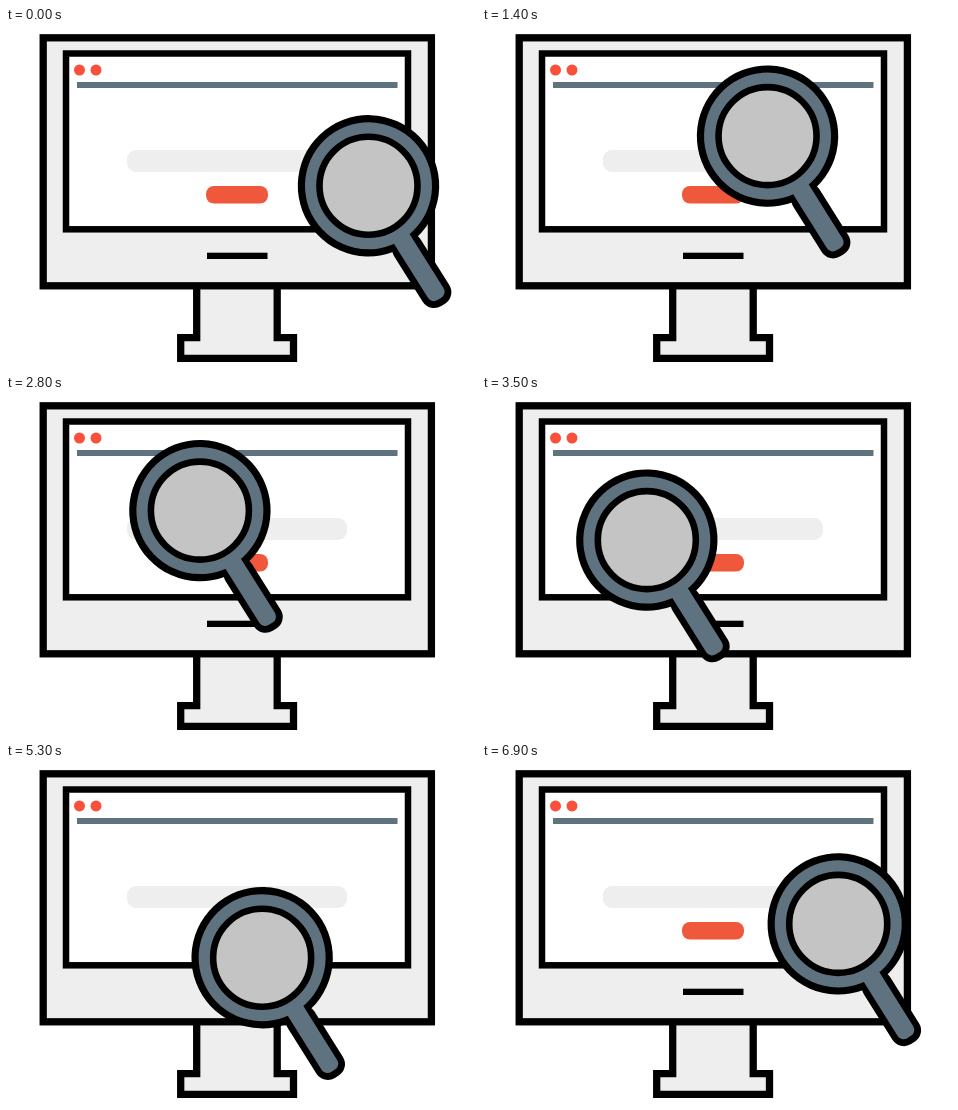
An HTML page for the animation above (7000 ms loop, 470 px wide and 340 px high).

```html
<!DOCTYPE html>
<html lang="en">
<head>
<meta charset="utf-8">
<title>Search</title>
<style>
  html, body { margin: 0; width: 100%; height: 100%; overflow: hidden; background: #fff; }
  svg { display: block; width: 470px; height: 340px; }
  .frame { fill: #eee; stroke: #000; stroke-width: 7.3; }
  .steel { fill: #5f727f; }
  .dot { fill: #f9503c; }
</style>
</head>
<body>
<svg viewBox="0 0 470 340">
  <path class="frame" d="M190.7 258V309.7H174.7V330.3H287.5V309.7H271.2V258"/>
  <rect class="frame" x="37.2" y="9.8" width="388.2" height="248"/>
  <rect class="frame" x="60" y="25.5" width="342" height="175.8" style="fill:#fff;stroke-width:6.5"/>
  <circle class="dot" cx="73.5" cy="42" r="5.5"/>
  <circle class="dot" cx="90" cy="42" r="5.5"/>
  <rect class="steel" x="71" y="54" width="320.5" height="6"/>
  <rect x="121" y="122" width="220" height="22" rx="9" fill="#eee"/>
  <rect x="200" y="158" width="62" height="17.5" rx="8" fill="#ef583b"/>
  <rect x="201" y="224.7" width="60.5" height="6.3"/>

  <g id="glass">
    <g transform="rotate(57.9)">
      <circle r="70.7"/>
      <rect x="60" y="-15.7" width="80.5" height="31.4" rx="13.5"/>
      <circle class="steel" r="63.5"/>
      <rect class="steel" x="55" y="-9.2" width="78.5" height="18.4" rx="7"/>
    </g>
    <circle r="49" fill="#c4c4c4" stroke="#000" stroke-width="6.6"/>
  </g>
</svg>
<script>
  const LOOP = 7000, STEP = 100;
  const glass = document.getElementById('glass');

  // The lens follows this curve at constant speed, with a corner where the loop restarts
  const route = document.createElementNS('http://www.w3.org/2000/svg', 'path');
  route.setAttribute('d', `M362.5 157.8
    C336 135 302 103 262 106
    S164.5 112 164.5 139
    S192 198 226 198
    S310 175 362.5 157.8`);
  const length = route.getTotalLength();

  let start;
  function draw(now) {
    start ??= now;
    const time = Math.floor((now - start) % LOOP / STEP) * STEP;
    const { x, y } = route.getPointAtLength(length * time / LOOP);
    glass.setAttribute('transform', `translate(${x} ${y})`);
    requestAnimationFrame(draw);
  }
  requestAnimationFrame(draw);
</script>
</body>
</html>
```
